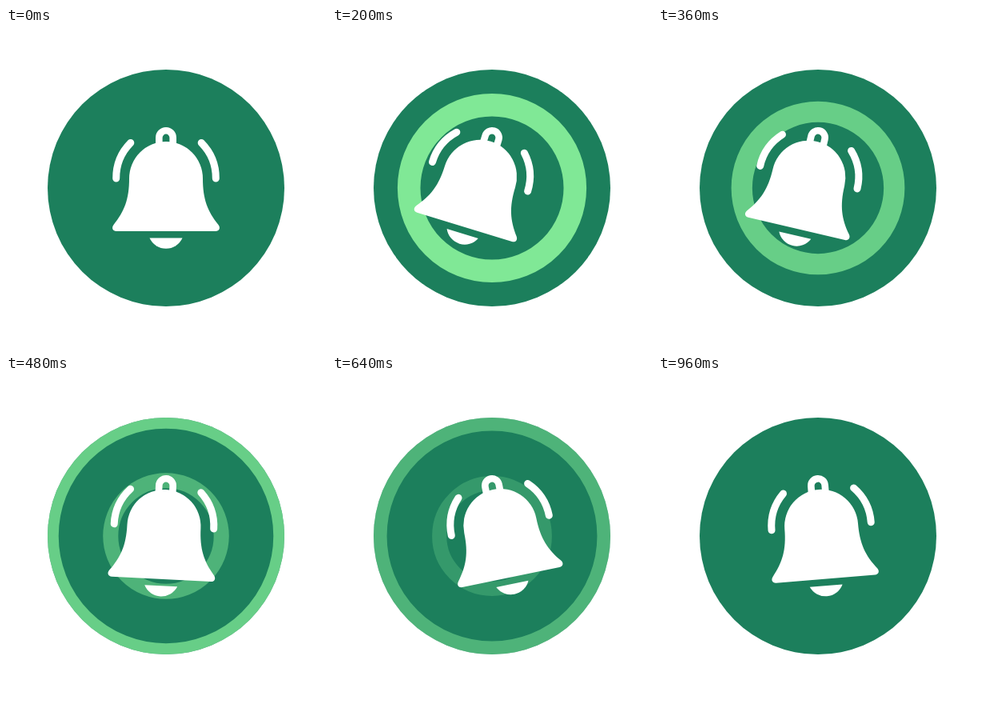
Write an HTML page that moves like this. It is 400x400 px and loops after 1000 ms.

```html
<!DOCTYPE html>
<html lang="en">
<head>
<meta charset="utf-8">
<title>Ringing bell</title>
<style>
  html, body { margin: 0; width: 100%; height: 100%; overflow: hidden; background: #fff; }
  svg { display: block; width: 100%; height: 100%; }
</style>
</head>
<body>
<svg viewBox="0 0 400 400">
  <clipPath id="disc"><circle cx="200" cy="200" r="148"/></clipPath>
  <circle cx="200" cy="200" r="148" fill="#1c7f5c"/>
  <g id="waves" clip-path="url(#disc)" fill="none" stroke="#80e896"></g>
  <g id="bell" fill="#fff">
    <path d="M154 188A46 46 0 0 1 246 188C246 214 252 229 265.500 246C268.500 250 266.500 254 262 254H138C133.500 254 131.500 250 134.500 246C148 229 154 214 154 188Z"/>
    <path d="M179.500 262.500H220.500A22.500 22.500 0 0 1 179.500 262.500Z"/>
    <g fill="none" stroke="#fff">
      <path d="M191.300 147V137A8.700 8.700 0 0 1 208.700 137V147" stroke-width="8.600"/>
      <path d="M155.800 143.500A62.500 62.500 0 0 0 137.700 188M244.200 143.500A62.500 62.500 0 0 1 262.300 188" stroke-width="9" stroke-linecap="round"/>
    </g>
  </g>
</svg>
<script>
const LOOP = 1000, STEP = 40, SWING = 20, LEFT = 260, RIGHT = 760;
const HOLE = 0.758; // inner / outer radius of a wave
const bell = document.getElementById('bell');
const waves = [22, 198, 365, 531].map((start, i) => {
  const el = document.createElementNS('http://www.w3.org/2000/svg', 'circle');
  el.setAttribute('cx', 200);
  el.setAttribute('cy', 200);
  el.setAttribute('stroke-opacity', 1 - i / 4);
  document.getElementById('waves').append(el);
  return { el, start };
});

const slowing = x => x * (1 + 0.47 * (1 - x));
const soft = x => x - 0.2 * Math.sin(2 * Math.PI * x) / (2 * Math.PI);

function angle(t) {
  if (t < LEFT) return SWING * slowing(t / LEFT);
  if (t < RIGHT) return SWING * (1 - 2 * soft((t - LEFT) / (RIGHT - LEFT)));
  return -SWING * slowing((LOOP - t) / (LOOP - RIGHT));
}

function draw(now) {
  const t = Math.floor(now % LOOP / STEP) * STEP;
  bell.setAttribute('transform', `rotate(${angle(t)} 200 137)`);
  for (const { el, start } of waves) {
    const age = t - start;
    const r = age > 0 && age < 340 ? 0.724 * age - 0.00034 * age * age : 0;
    el.setAttribute('r', r * (1 + HOLE) / 2);
    el.setAttribute('stroke-width', r * (1 - HOLE));
  }
  requestAnimationFrame(draw);
}
draw(0);
</script>
</body>
</html>
```
